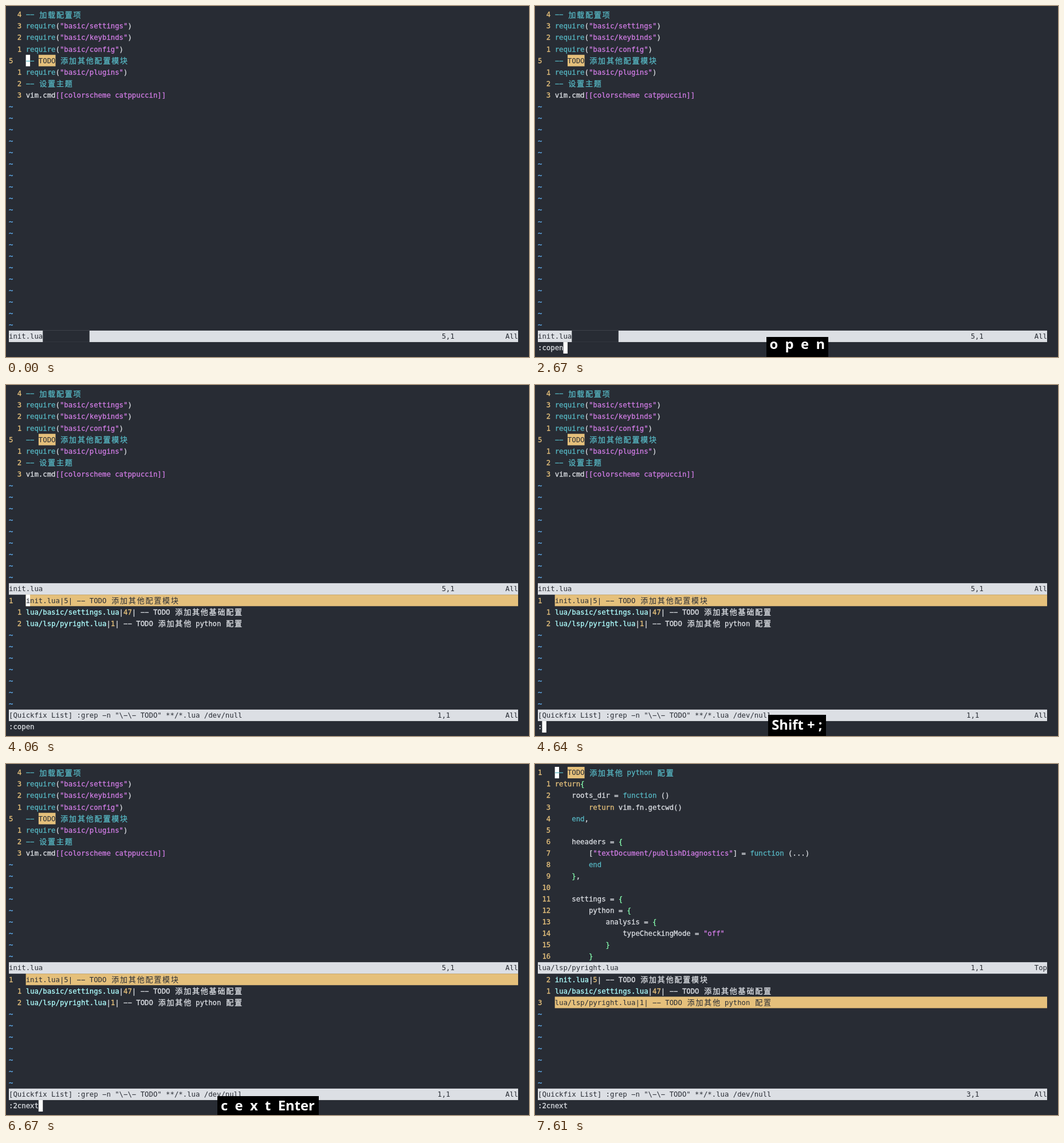
Write an HTML page with a canvas that moves like this. It is 913 px wide and 613 px high and loops after 8.16 s.

```html
<!DOCTYPE html>
<html lang="zh">
<head>
<meta charset="utf-8">
<title>Quickfix list</title>
<style>
html, body { margin: 0; width: 100%; height: 100%; overflow: hidden; background: #282c34; }
canvas { display: block; }
</style>
</head>
<body>
<canvas id="stage" width="913" height="613"></canvas>
<script>
const ctx = document.getElementById('stage').getContext('2d');
const LOOP = 8160, W = 913, H = 613;
const LEFT = 5, TOP = 5, COLS = 120, CELL_W = 889 / COLS, CELL_H = 602 / 30;
const MONO = '12.3px "DejaVu Sans Mono", monospace';
const CJK = '13px "Noto Sans CJK SC", "Noto Sans CJK", sans-serif';
const KEYS = 'bold 23.8px "Noto Sans", "Open Sans", sans-serif';

// One-letter colour codes used as prefixes in styled lines
const COLOR = {
  k: '#282c34', w: '#dcdfe4', y: '#e5c07b', b: '#61afef',
  m: '#d07ce4', c: '#56b6c2', g: '#87ffaf', f: '#afffff'
};

const OPEN_QF = 3190, LEAVE_QF = 4640, JUMP = 6740;

const COMMANDS = [
  [0, ''], [1000, ':'], [1500, ':c'], [2390, ':co'], [2450, ':cop'], [2520, ':cope'],
  [2670, ':copen'], [LEAVE_QF, ':'], [5100, ':2'], [5810, ':2c'], [6140, ':2cn'],
  [6200, ':2cne'], [6410, ':2cnex'], [6560, ':2cnext']
];

const CAPTIONS = [
  [0, ''], [700, 'Shift'], [910, 'Shift + ;'], [1430, 'Shift + ;  c'], [1830, 'c'],
  [2330, 'c  o'], [2390, 'o  p'], [2520, 'o  p  e'], [2670, 'o  p  e  n'],
  [3130, 'o  p  e  Enter'], [3260, 'p  e  Enter'], [3350, 'e  Enter'], [3440, 'Enter'],
  [4060, ''], [4370, 'Shift'], [4590, 'Shift + ;'], [5030, 'Shift + ;  2'], [5500, '2'],
  [5810, '2  c'], [5940, 'c'], [6080, 'c  n'], [6140, 'c  e'], [6340, 'c  e  x'],
  [6490, 'c  e  x  t'], [6670, 'c  e  x  t  Enter'], [JUMP, 'e  x  t  Enter'],
  [7070, 'x  t  Enter'], [7270, 't  Enter'], [7420, 'Enter'], [7610, '']
];

const load = name => ['crequire', 'w(', `m"basic/${name}"`, 'w)'];

const INIT = [
  ['c-- 加载配置项'],
  load('settings'),
  load('keybinds'),
  load('config'),
  ['c-- ', 'kTODO', 'c 添加其他配置模块'],
  load('plugins'),
  ['c-- 设置主题'],
  ['wvim.cmd', 'm[[colorscheme catppuccin]]']
];

const PYRIGHT = [
  ['c-- ', 'kTODO', 'c 添加其他 python 配置'],
  ['yreturn', 'g{'],
  ['w    roots_dir = ', 'cfunction', 'w ()'],
  ['y        return', 'w vim.fn.getcwd()'],
  ['c    end', 'w,'],
  [],
  ['w    heeaders = ', 'g{'],
  ['w        [', 'm"textDocument/publishDiagnostics"', 'w] = ', 'cfunction', 'w (...)'],
  ['c        end'],
  ['g    }', 'w,'],
  [],
  ['w    settings = ', 'g{'],
  ['w        python = ', 'g{'],
  ['w            analysis = ', 'g{'],
  ['w                typeCheckingMode = ', 'm"off"'],
  ['g            }'],
  ['g        }']
];

const QUICKFIX = [
  ['init.lua', '5', '添加其他配置模块'],
  ['lua/basic/settings.lua', '47', '添加其他基础配置'],
  ['lua/lsp/pyright.lua', '1', '添加其他 python 配置']
].map(([file, line, note]) => ['f' + file, 'w|', 'y' + line, `w| -- TODO ${note}`]);

const colX = col => LEFT + col * CELL_W;
const rowY = row => TOP + row * CELL_H;
const at = (list, t) => list.filter(step => step[0] <= t).pop()[1];

function cells(row, from, to, color) {
  ctx.fillStyle = color;
  ctx.fillRect(colX(from), rowY(row), (to - from) * CELL_W, CELL_H);
}

function cursor(row, col) {
  cells(row, col, col + 1, '#fff');
}

// Light text gets a hairline so it reads as strong as on a terminal
function glyph(ch, x, y, color) {
  ctx.fillText(ch, x, y);
  if (color !== COLOR.k) ctx.strokeText(ch, x, y);
}

// Draws text on the cell grid and returns the next free column
function put(row, col, text, color) {
  const y = rowY(row) + 14.3;
  ctx.fillStyle = ctx.strokeStyle = color;
  ctx.lineWidth = 0.3;
  for (const ch of text) {
    const wide = ch > '\u2e80';
    if (wide) {
      ctx.font = CJK;
      ctx.textAlign = 'center';
      glyph(ch, colX(col + 1) + 0.5, y + 0.3, color);
    } else if (ch !== ' ') {
      ctx.font = MONO;
      ctx.textAlign = 'left';
      glyph(ch === '-' ? '\u2212' : ch, colX(col), y, color);
    }
    col += wide ? 2 : 1;
  }
  return col;
}

function styled(row, parts, plain) {
  let col = 4;
  for (const part of parts) {
    const text = part.slice(1);
    if (text === 'TODO') cells(row, col, col + 4, COLOR.y);
    col = put(row, col, text, plain || COLOR[part[0]]);
  }
}

function lineNumber(row, index, current) {
  const label = index === current
    ? String(index + 1)
    : String(Math.abs(index - current)).padStart(3);
  put(row, 0, label, COLOR.y);
}

function buffer(lines, current, end) {
  for (let row = 0; row < end; row++) {
    if (row < lines.length) {
      lineNumber(row, row, current);
      styled(row, lines[row]);
    } else {
      put(row, 0, '~', COLOR.b);
    }
  }
}

function statusBar(row, name, pos, posCol, extent) {
  cells(row, 0, COLS, COLOR.w);
  put(row, 0, name, COLOR.k);
  put(row, posCol, pos, COLOR.k);
  put(row, COLS - 3, extent, COLOR.k);
}

function quickfix(current, focused) {
  const top = 18;
  cells(top + current, 4, COLS, COLOR.y);
  if (focused) cursor(top + current, 4);
  QUICKFIX.forEach((parts, i) => {
    lineNumber(top + i, i, current);
    styled(top + i, parts, i === current ? COLOR.k : null);
  });
  for (let row = top + QUICKFIX.length; row < 28; row++) put(row, 0, '~', COLOR.b);
  statusBar(28, '[Quickfix List] :grep -n "\\-\\- TODO" **/*.lua /dev/null',
    `${current + 1},1`, 101, 'All');
}

// The key caption's box hugs the ink of its text
function caption(text) {
  if (!text) return;
  ctx.font = KEYS;
  ctx.textAlign = 'left';
  const m = ctx.measureText(text);
  const ink = m.actualBoundingBoxLeft + m.actualBoundingBoxRight;
  const tall = m.actualBoundingBoxAscent + m.actualBoundingBoxDescent;
  const left = 457.5 - ink / 2;
  const h = Math.round(tall + 16);
  ctx.fillStyle = '#000';
  ctx.fillRect(Math.round(left - 7), H - h, Math.round(ink + 14), h);
  ctx.fillStyle = '#fff';
  ctx.fillText(text, left + m.actualBoundingBoxLeft, H - 8.5 - m.actualBoundingBoxDescent);
}

function draw(t) {
  const split = t >= OPEN_QF, jumped = t >= JUMP;
  const inList = split && t < LEAVE_QF;
  const command = at(COMMANDS, t);

  ctx.fillStyle = COLOR.k;
  ctx.fillRect(0, 0, W, H);

  if (jumped) cursor(0, 4);
  else if (!command) cursor(4, 4);
  else if (!inList) cursor(29, command.length);

  if (jumped) buffer(PYRIGHT, 0, 17);
  else buffer(INIT, 4, split ? 17 : 28);

  if (split) {
    if (jumped) statusBar(17, 'lua/lsp/pyright.lua', '1,1', 102, 'Top');
    else statusBar(17, 'init.lua', '5,1', 102, 'All');
    quickfix(jumped ? 2 : 0, inList);
  } else {
    statusBar(28, 'init.lua', '5,1', 102, 'All');
    cells(28, 8, 19, COLOR.k);
  }

  put(29, 0, command, COLOR.w);
  caption(at(CAPTIONS, t));
}

const start = performance.now();
function tick() {
  draw((performance.now() - start) % LOOP);
  requestAnimationFrame(tick);
}
tick();
</script>
</body>
</html>
```
